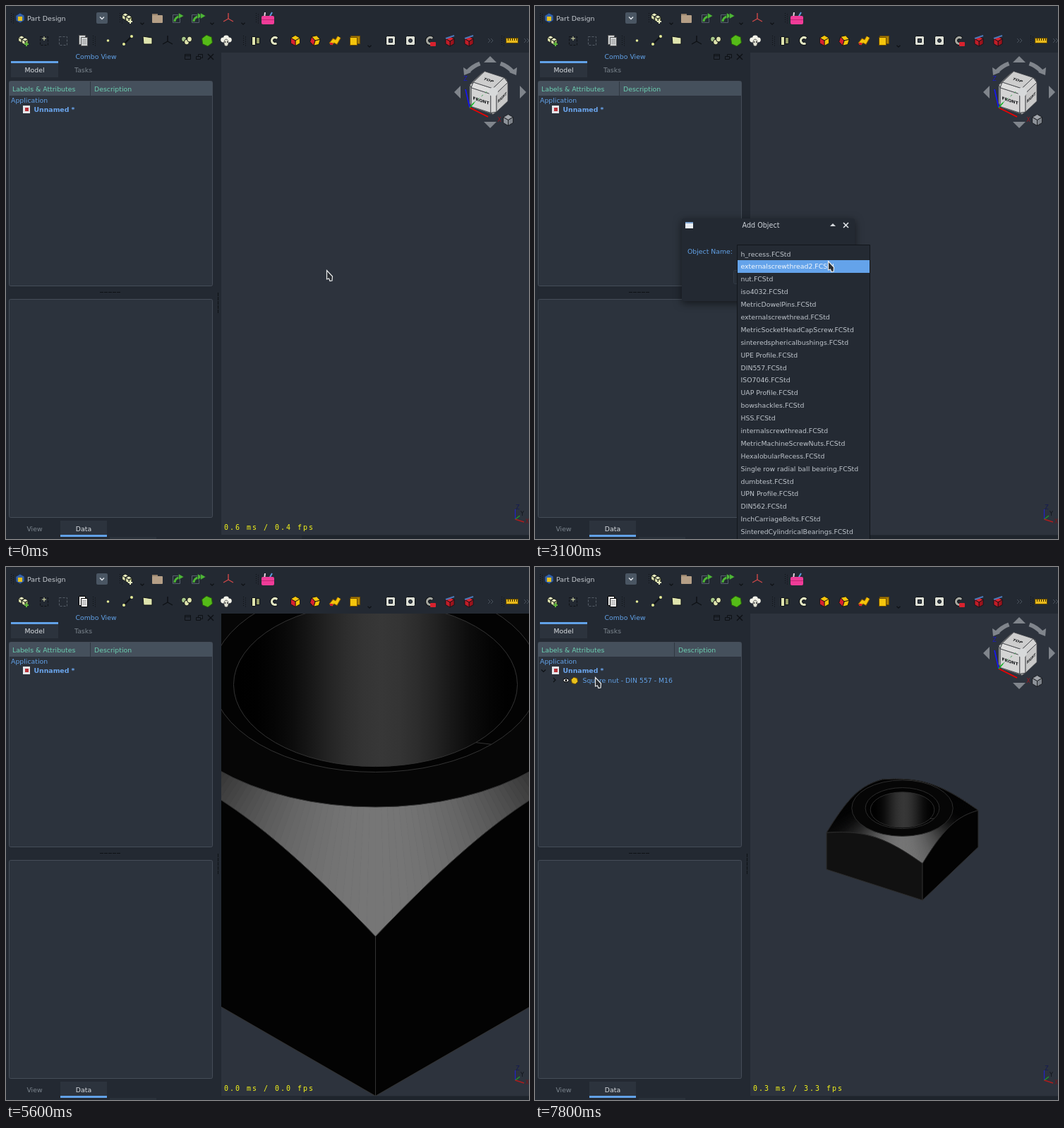
Animation, 741 px wide and 755 px high, one loop 8 s. Source, as an HTML page with a canvas:

```html
<!DOCTYPE html>
<html lang="en">
<head>
<meta charset="utf-8">
<title>Add Object</title>
<style>
html, body { margin: 0; width: 100%; height: 100%; overflow: hidden; background: #232932; }
canvas { display: block; }
</style>
</head>
<body>
<canvas id="c" width="741" height="755"></canvas>
<script>
const g = document.getElementById('c').getContext('2d');
const LOOP = 8000, STEP = 100, { PI, sin, cos, sqrt, max, abs } = Math;
const BG = '#232932', PANEL = '#2c333d', VIEW = '#2d333d', BLUE = '#62a2e8', TEAL = '#6ccfb2';
const INK = '#0e1115', CREAM = '#dfe4ae', OLIVE = '#969c68', RED = '#d8222e', GOLD = '#f5c50c', GREEN = '#4db636';
const SANS = '"DejaVu Sans", sans-serif';

// ---------- helpers ----------
const range = n => [...Array(n).keys()];
const grey = v => `rgb(${v},${v},${v})`;
function paint(fill, stroke, lw = 1) {
  if (fill) { g.fillStyle = fill; g.fill(); }
  if (stroke) { g.strokeStyle = stroke; g.lineWidth = lw; g.stroke(); }
}
function path(pts, close, ...style) {
  g.beginPath();
  pts.forEach(p => g.lineTo(...p));
  if (close) g.closePath();
  paint(...style);
}
const poly = (pts, ...style) => path(pts, true, ...style);
const line = (x0, y0, x1, y1, color, lw) => path([[x0, y0], [x1, y1]], false, null, color, lw);
function ngon(x, y, r, n, turn, ...style) {
  poly(range(n).map(i => turn + i * 2 * PI / n).map(a => [x + r * cos(a), y + r * sin(a)]), ...style);
}
function rect(x, y, w, h, fill, stroke) {
  round(x, y, w, h, 0, fill, stroke);
}
function round(x, y, w, h, r, fill, stroke) {
  const d = stroke ? .5 : 0;
  g.beginPath();
  g.roundRect(x + d, y + d, w - 2 * d, h - 2 * d, r);
  paint(fill, stroke);
}
function oval(x, y, rx, ry, ...style) {
  g.beginPath();
  g.ellipse(x, y, rx, ry, 0, 0, 2 * PI);
  paint(...style);
}
function arc(x, y, r, a, b, color, lw) {
  g.beginPath();
  g.arc(x, y, r, a, b);
  paint(null, color, lw);
}
function dashed(pattern, draw) {
  g.setLineDash(pattern);
  draw();
  g.setLineDash([]);
}
// y is the middle of the capitals
function text(s, x, y, color, { align = 'left', font = SANS, size = 9.33, weight = '' } = {}) {
  g.font = `${weight} ${size}px ${font}`;
  g.textAlign = align;
  g.fillStyle = color;
  g.fillText(s, x, Math.floor(y + 3.5));
}
function at(x, y, draw) {
  g.save();
  g.translate(x, y);
  draw();
  g.restore();
}
function cube(x, y, s, top, left, right) {
  [[top, -PI / 2], [right, PI / 6], [left, PI * 5 / 6]].forEach(([fill, mid]) => {
    const p = a => [x + s * cos(a), y + s * sin(a)];
    poly([[x, y], p(mid - PI / 3), p(mid), p(mid + PI / 3)], fill, INK, .8);
  });
}
function chevron(x, y, color, s = 3, lw = 1.4) {
  path([[x - s, y - s / 2], [x, y + s / 2], [x + s, y - s / 2]], false, null, color, lw);
}
function grip(x, y) {
  range(10).forEach(i => rect(x - 2 + i % 2 * 3, y - 7 + i * 1.5, 1, 1, INK));
}
function more(x, y) {
  [x, x + 4].forEach(u => path([[u - 4, y - 3], [u - 1, y], [u - 4, y + 3]], false, null, '#49515c'));
}

// ---------- toolbars, icons drawn around 0,0 ----------
const icon = {
  body(plus) {
    cube(-3, -2, 5, '#eef2c4', CREAM, OLIVE);
    cube(2, 1, 5, '#eef2c4', CREAM, OLIVE);
    line(4, 2, 4, 8, plus, 2); line(1, 5, 7, 5, plus, 2);
  },
  share(heads) {
    rect(-7, -5, 11, 12, null, '#56616d');
    arc(3, 5, 7, PI, PI * 1.5, GREEN, 3);
    range(heads).forEach(i => ngon(4 + i * 4, -3, 5, 3, 0, GREEN, BG, .6));
  },
  axes(color) {
    range(3).forEach(i => {
      const a = -PI / 2 + i * 2 * PI / 3;
      line(0, 1, 8 * cos(a), 1 + 8 * sin(a), color, 1.4);
    });
  },
  toolbox() {
    line(-5, 0, -4, -8, '#e9d4de', 2);
    line(2, -1, 6, -8, '#5d9cdc', 2);
    round(-9, -3, 18, 12, 2, '#f03c98');
    rect(-9, 2, 18, 1, '#c22675');
  },
  sketch(color) {
    dashed([3, 2], () => rect(-6, -6, 12, 13, null, color));
  },
  page(on) {
    const edge = on ? '#000' : '#555', fill = on ? '#fff' : '#d4d7d9';
    rect(-7, -8, 10, 14, fill, edge);
    rect(-4, -5, 10, 13, fill, edge);
    range(4).forEach(i => rect(-2, -2 + i * 2, 6, 1, '#999'));
  },
  edge() {
    line(-5, 5, 6, -6, INK, 2);
    oval(-5, 5, 2, 2, '#e6ec98'); oval(6, -6, 2, 2, '#e6ec98');
  },
  binder() {
    range(3).forEach(i => oval(i * 4 - 4, i % 2 * 4 - 2, 3.5, 4, i ? CREAM : '#a5c58a', INK));
  },
  head() {
    range(3).forEach(i => oval(i * 4 - 4, i % 2 * -3 - 1, 3.8, 3.4, '#f3f3e9'));
    oval(0, 3, 3.2, 5, '#dedfd2', '#333', .7);
    rect(-2, 1, 1, 2, '#111'); rect(1, 1, 1, 2, '#111');
  },
  pad() {
    rect(-5, -6, 6, 13, CREAM, INK);
    rect(1, -5, 6, 10, OLIVE, INK);
  },
  groove(dot) {
    arc(0, 0, 4.5, .9, 5.6, INK, 5);
    arc(0, 0, 4.5, 1, 5.5, dot ? '#a6a8a0' : '#e4e8c4', 3);
    if (dot) round(0, 2, 8, 6, 1, RED);
  },
  solid(turn) {
    g.rotate(turn);
    cube(0, 0, 7.5, GOLD, RED, GOLD);
  },
  pipe() {
    [['#8a5a00', 6], [GOLD, 4]].forEach(([c, w]) =>
      path([[-6, 5], [-2, 0], [2, 2], [6, -5]], false, null, c, w));
    rect(-7, 3, 4, 3, RED);
  },
  hole(r) {
    round(-7, -7, 14, 14, 2, '#dcdfd6', INK);
    round(-3, -3, 6, 6, r, '#3c4550', INK);
  },
  cut() {
    cube(0, 1, 7, RED, '#c11d28', '#9c141d');
    line(-6, -3, 6, -7, '#4b79b8', 2);
  },
  ruler() {
    rect(-9, -4, 18, 8, '#e9b91c', '#5c4500');
    range(5).forEach(i => rect(-6 + i * 3, -3, 1, 3, '#3a2b00'));
  }
};
const TOP_ROW = [['body', 172, '#e9edc0'], ['share', 243, 1], ['share', 270, 2], ['axes', 315, '#d04848'], ['toolbox', 371]];
const LOW_ROW = [['body', 25, '#5fb83b'], ['sketch', 54, INK], ['sketch', 81, '#555d67'], ['edge', 172],
  ['axes', 229, INK], ['binder', 256], ['head', 312], ['pad', 353], ['groove', 381], ['solid', 410, 0],
  ['solid', 438, .3], ['pipe', 466], ['hole', 545, 0], ['hole', 573, 3], ['groove', 601, true], ['cut', 629],
  ['cut', 656], ['ruler', 717]];

function toolbars(enabled) {
  [9, 163, 356].forEach(x => grip(x, 17));
  [125, 338, 704].forEach(x => grip(x, 49));
  [193, 292, 336].forEach(x => chevron(x, 25, INK, 2.5, 1.2));
  chevron(515, 57, INK, 2.5, 1.2);
  ngon(20, 17, 7, 6, .5, '#3663a8', '#182c50');
  rect(17, 15, 6, 6, '#e7c11d');
  text('Part Design', 30, 17.5, '#c6cbd1', { size: 9.5 });
  round(128, 9, 16, 16, 2, '#4a5663');
  chevron(136, 17, '#e6eaee');
  rect(207, 11, 8, 5, '#94806a');
  round(207, 13, 15, 11, 1, '#b59f86');
  TOP_ROW.forEach(([name, x, arg]) => at(x, 17, () => icon[name](arg)));
  LOW_ROW.forEach(([name, x, arg]) => at(x, 49, () => icon[name](arg)));
  at(110, 49, () => icon.page(enabled));
  line(54, 43, 54, 49, CREAM); line(51, 46, 57, 46, CREAM);
  oval(144.5, 49, 1.8, 1.8, '#e6ec98');
  poly([[194, 43], [207, 45], [207, 54], [195, 54]], CREAM, INK);
  ngon(285, 49, 8, 6, .4, '#55bb18', '#285f0b');
  rect(488, 42, 14, 12, '#a87d05', '#6c4a00');
  rect(487, 44, 11, 12, GOLD, '#6c4a00');
  more(687, 49);
  more(738, 49);
}

// ---------- side panel ----------
function tab(label, x, w, y, barY, active) {
  if (active) {
    rect(x, y, w, 22, PANEL);
    rect(x, barY, w, 3, BLUE);
  }
  text(label, x + w / 2, y + 11.5, active ? '#dde1e5' : '#7c858e', { align: 'center' });
}
function sidePanel(filled) {
  text('Combo View', 127.5, 72, BLUE, { align: 'center' });
  rect(253, 68, 9, 8, null, INK); rect(253, 70, 9, 1, INK);
  rect(272, 68, 7, 6, null, INK); rect(269, 71, 7, 5, BG, INK);
  line(286, 68, 294, 76, INK, 1.5); line(294, 68, 286, 76, INK, 1.5);
  tab('Model', 7, 67, 79, 78, true);
  tab('Tasks', 76, 67, 79);
  round(4, 106, 289, 291, 2, PANEL, '#454d58');
  round(4, 415, 289, 310, 2, PANEL, '#454d58');
  rect(5, 107, 287, 20, '#45505c');
  const split = filled ? 197 : 119;
  rect(split, 107, 1, 20, '#2f3740');
  text('Labels & Attributes', 9, 117.5, TEAL);
  text('Description', split + 6, 117.5, TEAL);
  text('Application', 7, 133.5, BLUE);
  rect(24, 141, 10, 11, '#e4e6ea');
  rect(27, 144, 5, 5, '#b63038');
  text('Unnamed *', 39.5, 146.5, '#6ba6ee', { weight: 'bold' });
  if (filled) {
    chevron(12, 147, INK, 3, 1.2);
    path([[26, 157], [29, 160], [26, 163]], false, null, INK, 1.2);
    oval(44, 160.5, 4, 2.6, '#f2f2f2', '#000');
    oval(44, 160.5, 1.5, 1.5, '#000');
    ngon(56, 161, 5, 6, .3, '#e8c11c', '#6c4a00');
    text('Square nut - DIN 557 - M16', 67.5, 161, BLUE);
  }
  range(5).forEach(i => {
    rect(133 + i * 6, 405, 5, 1, INK);
    rect(300, 406 + i * 6, 1, 5, INK);
  });
  tab('View', 7, 67, 729);
  tab('Data', 77, 66, 729, 749, true);
  rect(147, 752, 66, 3, '#2a313a');
}

// ---------- 3D ----------
// yaw turns the model, tilt is the sine of the camera's elevation
const TRI = { yaw: .526, tilt: .554 }, ISO = { yaw: PI / 4, tilt: sqrt(1 / 3) };
function project({ x, y, s, yaw, tilt }, [X, Y, Z]) {
  return [x + s * (X * cos(yaw) + Y * sin(yaw)),
    y + s * (tilt * (X * sin(yaw) - Y * cos(yaw)) - sqrt(1 - tilt * tilt) * Z)];
}

// square nut in mm
const NUT = { half: 12, high: 13, flat: 10.95, mouth: 8, bore: 6.92, sink: .43 };
function nut(cam, front, right, edge) {
  const P = (...v) => project(cam, v);
  const polar = (r, z, a) => P(r * cos(a), r * sin(a), z);
  const rim = a => {
    const r = NUT.half / max(abs(cos(a)), abs(sin(a)));
    return polar(r, NUT.high - (r - NUT.flat) / sqrt(3), a);
  };
  const sweep = (a, b, n) => range(n + 1).map(i => a + (b - a) * i / n);
  const ring = (r, z, ...style) => oval(...P(0, 0, z), cam.s * r, cam.s * r * cam.tilt, ...style);
  const side = (from, fill) => {
    const foot = a => polar(NUT.half * sqrt(2), 0, a);
    poly([foot(from), ...sweep(from, from + PI / 2, 40).map(rim), foot(from + PI / 2)], fill, edge);
  };
  const N = 240, facing = cam.yaw - PI / 2;
  range(N).forEach(i => {
    const a = i * 2 * PI / N, b = a + 2 * PI / N;
    const fill = grey(4 + 114 * max(0, cos(a + PI / N - facing)) ** 2.6);
    poly([rim(a), rim(b), polar(NUT.flat, NUT.high, b), polar(NUT.flat, NUT.high, a)], fill, fill, .7);
  });
  poly(sweep(0, 2 * PI, N).map(rim), null, edge);
  side(-PI * .75, front);
  side(-PI / 4, right);
  ring(NUT.flat, NUT.high, '#060606', edge);
  ring(NUT.mouth, NUT.high, '#030303', edge);
  const depth = NUT.high - NUT.sink, r = cam.s * NUT.bore, cx = cam.x + r * .04;
  const wall = g.createLinearGradient(cx - r, 0, cx + r, 0);
  sweep(0, 1, 16).forEach(k => wall.addColorStop(k, grey(55 * (1 - (2 * k - 1) ** 2) ** 3)));
  ring(NUT.bore, depth, wall, edge);
  path([P(NUT.bore, 0, depth), P(NUT.mouth, 0, NUT.high)], false, null, edge);
}

const SIGNS = [-1, 0, 1];
const DIRS = SIGNS.flatMap(x => SIGNS.flatMap(y => SIGNS.map(z => [x, y, z]))).filter(d => d.some(Boolean));
const dot = (a, b) => a.reduce((sum, v, i) => sum + v * b[i], 0);
function navCube() {
  const cam = { x: 684, y: 123, s: 1, ...TRI }, OUT = 22, IN = 16, c = sqrt(1 - cam.tilt ** 2);
  const eye = [sin(cam.yaw) * c, -cos(cam.yaw) * c, cam.tilt];
  const corners = DIRS.filter(d => d.every(Boolean))
    .flatMap(d => range(3).map(k => d.map((v, i) => v * (i === k ? OUT : IN))));
  // a facet holds the corners that reach furthest along its direction
  DIRS.filter(d => dot(d, eye) > 0).forEach(d => {
    const far = Math.max(...corners.map(v => dot(v, d)));
    const pts = corners.filter(v => dot(v, d) === far).map(v => project(cam, v));
    const mx = pts.reduce((s, p) => s + p[0], 0) / pts.length, my = pts.reduce((s, p) => s + p[1], 0) / pts.length;
    const turn = p => Math.atan2(p[1] - my, p[0] - mx);
    pts.sort((a, b) => turn(a) - turn(b));
    poly(pts, grey(180 + 45 * dot(d, eye) / sqrt(dot(d, d))), '#3a3d42', .8);
  });
  oval(...project(cam, [18, -18, 18]), 6.5, 6.5, '#d7d9da');
  const X = [cos(cam.yaw), cam.tilt * sin(cam.yaw)], Y = [sin(cam.yaw), -cam.tilt * cos(cam.yaw)];
  const label = (s, pos, u, v) => at(...project(cam, pos), () => {
    g.transform(...u, ...v, 0, 0);
    text(s, 0, 0, '#15171a', { align: 'center', size: 7, weight: 'bold' });
  });
  label('FRONT', [0, -OUT, 0], X, [0, c]);
  label('RIGHT', [OUT, 0, 0], Y, [0, c]);
  label('TOP', [0, 0, OUT], X, Y.map(v => -v));

  const shade = '#80858c';
  at(686, 122, () => {
    range(4).forEach(i => {
      g.rotate(PI / 2);
      poly([[51, 0], [42, -9], [42, 9]], shade);
    });
    [1, 2].forEach(() => {
      g.scale(-1, 1);
      arc(0, 0, 43, -PI * .39, -PI * .24, shade, 6);
      poly([[38, -35], [37, -24], [27, -28]], shade);
    });
  });
  line(651, 118, 657, 144, '#1515ff', 1.6);
  line(657, 144, 683, 157, '#f00000', 1.8);
  line(657, 144, 663, 137, '#10b820', 1.6);
  dashed([3, 4], () => line(663, 137, 684, 119, '#3c9a50'));
  text('Z', 651, 103, '#1c1cc4', { align: 'center', size: 8 });
  text('X', 699, 161, '#9b1820', { align: 'center', size: 8 });
  cube(711.5, 161.5, 8, '#a1a5ab', '#8d9299', '#7d8289');
}
function cross() {
  const [x, y] = [721.5, 727], small = { align: 'center', size: 8 };
  line(x, y, x, 713, '#2222c8', 1.2);
  line(x, y, 728, 722, '#1d9a2c', 1.4);
  line(x, y, 734, 731, '#b01c1c', 1.4);
  text('Z', 725, 710, '#141a55', small);
  text('Y', 731.5, 719, '#11151b', small);
  text('X', 738.5, 729.5, '#7a1418', small);
}
function fps(ms, rate) {
  g.letterSpacing = '1.98px';
  text(`${ms} ms / ${rate} fps`, 309, 739, '#f4f41a', { font: '"DejaVu Sans Mono", monospace', size: 10 });
  g.letterSpacing = '0px';
}
function view(t) {
  g.save();
  g.beginPath();
  g.rect(305, 66, 436, 683);
  g.clip();
  rect(305, 66, 436, 683, VIEW);
  const close = t >= 5500 && t < 6200, far = t >= 6500;
  if (close) nut({ x: 523.5, y: 464.7, s: 29.05, ...ISO }, '#030303', '#030303', '#333');
  if (far) nut({ x: 520.5, y: 412.5, s: 6.55, ...TRI }, '#111', '#030303', '#2c2c2c');
  if (t < 5500 || far) navCube();
  if (t < 6200 || far) {
    cross();
    if (far) fps('0.3', '3.3');
    else if (close) fps('0.0', '0.0');
    else if (t >= 1700) fps('1.3', '1.0');
    else fps('0.6', '0.4');
  }
  g.restore();
  rect(419, 750, 322, 5, '#1e242c');
}

// ---------- dialog and list ----------
const FILES = ['h_recess', 'externalscrewthread2', 'nut', 'iso4032', 'MetricDowelPins', 'externalscrewthread',
  'MetricSocketHeadCapScrew', 'sinteredsphericalbushings', 'UPE Profile', 'DIN557', 'ISO7046', 'UAP Profile',
  'bowshackles', 'HSS', 'internalscrewthread', 'MetricMachineScrewNuts', 'HexalobularRecess',
  'Single row radial ball bearing', 'dumbtest', 'UPN Profile', 'DIN562', 'InchCarriageBolts',
  'SinteredCylindricalBearings'].map(n => n + '.FCStd');
const ROW = 17.89, LIST_TOP = 342;

function button(x, w, label, textX) {
  round(x, 374, w, 20, 2, '#272e37', '#323a45');
  text(label, textX, 384, BLUE);
  rect(textX, 389, 7, 1, BLUE);
}
function dialog(file, alpha) {
  g.save();
  g.globalAlpha = alpha;
  g.shadowColor = 'rgba(0,0,0,.55)'; g.shadowBlur = 12; g.shadowOffsetY = 3;
  round(208, 301, 245, 117, 3, BG);
  g.shadowColor = 'transparent';
  rect(213, 306, 11, 9, '#e9edf2'); rect(213, 306, 11, 2, '#7fa6d4');
  text('Add Object', 320, 311, '#cdd2d8', { align: 'center', size: 9.6 });
  poly([[418, 312], [422, 308], [426, 312]], '#d6dade');
  line(437, 307, 444, 314, '#e4e7ea', 1.6); line(444, 307, 437, 314, '#e4e7ea', 1.6);
  text('Object Name:', 280, 347.5, BLUE, { align: 'right' });
  round(286, 338, 157, 18, 2, PANEL, BLUE);
  rect(428, 339, 14, 16, BLUE);
  chevron(435, 347, '#fff');
  text(file, 288.5, 347.5, '#7b9fcb');
  button(281, 81, 'Cancel', 313);
  oval(303.5, 383.5, 5, 5, '#df1010', '#f0dcdc');
  button(375, 64, 'OK', 407);
  path([[395, 384], [399, 386], [404, 379]], false, null, '#7d8a5c', 4);
  g.restore();
}
function list(y) {
  rect(286, 338, 189, 420, '#242a33', '#12161b');
  const picked = max(0, Math.floor((y - LIST_TOP) / ROW));
  rect(287, Math.round(LIST_TOP + picked * ROW), 187, 18, '#64a3ea');
  FILES.forEach((s, i) => text(s, 291.5, 351.5 + i * ROW, i === picked ? '#f4f8fd' : '#bfc5cc'));
}

// ---------- pointer: each move is start, end, x, y ----------
const MOVES = [[0, 800, 346, 20], [800, 1000, 368, 14], [1000, 1200, 374, 30], [1200, 1500, 380, 15],
  [1900, 2400, 437, 345], [2900, 3100, 415, 361], [3100, 4200, 416, 504], [4300, 5200, 409, 384],
  [7200, 7600, 79, 149], [7700, 7800, 85, 156]];
function pointerAt(t) {
  let x = 454, y = 374;
  for (const [from, to, tx, ty] of MOVES) {
    if (t <= from) break;
    const k = 1 - max(0, (to - t) / (to - from)) ** 1.5;
    x += (tx - x) * k;
    y += (ty - y) * k;
  }
  return [Math.round(x), Math.round(y)];
}
function pointer(x, y) {
  const outline = [[.5, .5], [.5, 13], [3.5, 12], [5, 15.5], [8, 15], [8.5, 9]];
  at(x, y, () => poly(outline, '#2b2f34', '#eceeef', 1.2));
}

// ---------- scene ----------
function draw(t) {
  const [x, y] = pointerAt(t);
  rect(0, 0, 741, 755, BG);
  toolbars(t >= 5400);
  sidePanel(t >= 6300);
  view(t);
  if (t >= 1700 && t < 5400) dialog(FILES[t < 4400 ? 0 : 9], t < 1800 ? .5 : 1);
  if (t >= 2700 && t < 4400) list(y);
  if (t < 5500 || t >= 6200) pointer(x, y);
}
let shown = -1;
const start = performance.now();
function tick() {
  const t = Math.floor(((performance.now() - start) % LOOP) / STEP) * STEP;
  if (t !== shown) draw(shown = t);
  requestAnimationFrame(tick);
}
tick();
</script>
</body>
</html>
```
